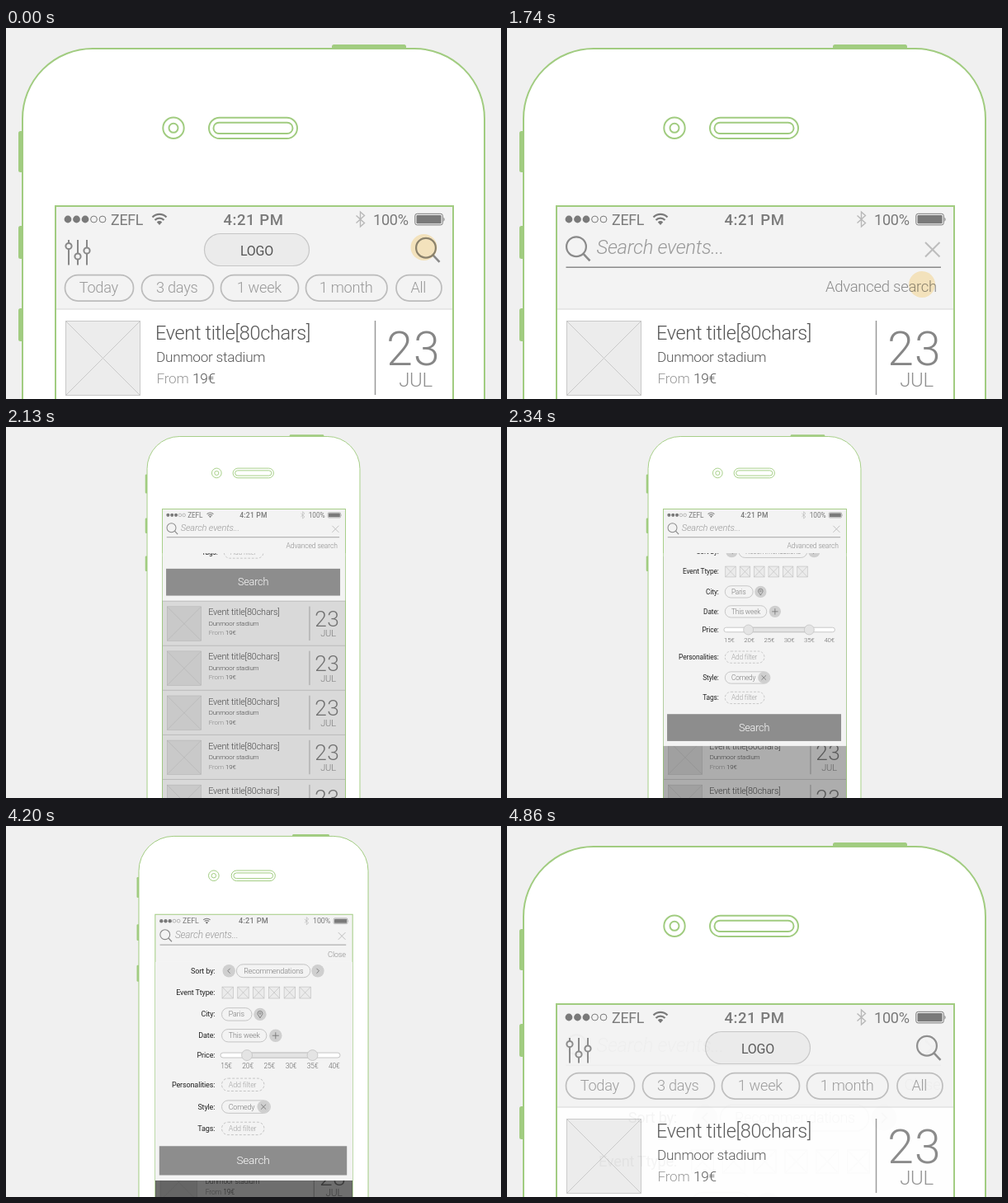
Recreate the animation shown at these times as an HTML page. Size 600 by 450 pixels, loop 6.46 s.

```html
<!DOCTYPE html>
<html lang="en">
<head>
<meta charset="utf-8">
<title>Event search</title>
<style>
  html, body { margin: 0; width: 100%; height: 100%; overflow: hidden; background: #f0f0f0; }
  svg { display: block; width: 100vw; height: 100vh; }
  text { font-family: Roboto, "Liberation Sans", sans-serif; font-weight: 300; letter-spacing: -.015em; white-space: pre; }
  .reg { font-weight: 400; }
  .med { font-weight: 500; letter-spacing: .03em; }
  .day { letter-spacing: .02em; }
  .touch { mix-blend-mode: multiply; fill: #ffeec6; }
</style>
</head>
<body>
<svg id="stage" viewBox="0 0 600 450"></svg>
<script>
const LOOP = 6460, STEP = 30, SMALL = 0.4606;
const CLOSED = 341, OPEN = 866, ROW = 117.4, HEADER_END = 332;
const GREEN = '#a1cc80';

// ---- drawing helpers ----
const text = (x, y, s, size, fill, anchor = 'start', extra = '') =>
  `<text x="${x}" y="${y}" font-size="${size}" fill="${fill}" text-anchor="${anchor}" ${extra}>${s}</text>`;
const rect = (x, y, w, h, attrs) => `<rect x="${x}" y="${y}" width="${w}" height="${h}" ${attrs}/>`;
const circle = (x, y, r, attrs) => `<circle cx="${x}" cy="${y}" r="${r}" ${attrs}/>`;
const path = (d, stroke, width = 2, extra = '') =>
  `<path d="${d}" fill="none" stroke="${stroke}" stroke-width="${width}" ${extra}/>`;
const group = (id, body, extra = '') => `<g id="${id}" ${extra}>${body}</g>`;
const pill = (x1, x2, y, h, extra = '') =>
  rect(x1, y - h / 2, x2 - x1, h, `rx="${h / 2}" fill="none" stroke="#bcbcbc" stroke-width="1.7" ${extra}`);
const crossBox = (x, y, w, h, fill, stroke, width) =>
  rect(x, y, w, h, `fill="${fill}" stroke="${stroke}" stroke-width="${width}"`) +
  path(`M${x} ${y}l${w} ${h}m0 ${-h}l${-w} ${h}`, stroke, width);

// ---- parts of the picture ----
function phone() {
  const line = `fill="none" stroke="${GREEN}" stroke-width="2"`;
  const key = (x, y, w, h) => rect(x, y, w, h, `rx="2.5" fill="${GREEN}"`);
  return key(15, 125, 9, 50) + key(15, 240, 9, 40) + key(15, 340, 9, 40) + key(395, 20, 90, 9) +
    rect(20, 25, 560, 1200, `rx="85" fill="#fff" stroke="${GREEN}" stroke-width="2"`) +
    circle(203, 121.3, 12.7, line) + circle(203, 121.3, 5.5, line) +
    rect(246, 108.7, 107, 25.4, `rx="12.7" ${line}`) + rect(251.5, 114.7, 96, 13.4, `rx="6.7" ${line}`);
}

function row(k) {
  const y = CLOSED + k * ROW;
  return path(`M61 ${y}H541`, k ? '#cacaca' : '#e2e2e2', 1.5) +
    crossBox(72.5, y + 14.5, 90, 90, '#ececec', '#c9c9c9', 1) +
    text(181, y + 37.4, 'Event title[80chars]', 23.5, '#555') +
    text(182, y + 64, 'Dunmoor stadium', 17.2, '#555') +
    text(182.5, y + 89.5, 'From', 17.2, '#999') +
    text(226, y + 89.5, '19€', 17.2, '#555') +
    path(`M447.5 ${y + 14}v90`, '#999', 1.5) +
    text(494, y + 67.5, '23', 57, '#868686', 'middle', 'class="day"') +
    text(496.5, y + 94, 'JUL', 24, '#909090', 'middle');
}

function status() {
  const c = '#7a7a7a';
  let s = '';
  for (let i = 0; i < 5; i++)
    s += circle(75 + i * 10.5, 232, i < 3 ? 4.4 : 3.9, i < 3 ? `fill="${c}"` : `fill="none" stroke="${c}"`);
  return s + text(127, 238.5, 'ZEFL', 17.8, c, 'start', 'class="reg"') +
    path('M177.5 229.5a12 12 0 0 1 17 0M180.5 233a7.7 7.7 0 0 1 11 0', c, 2.3) +
    `<path d="M186 239l-3.2 -3.6a4.5 4.5 0 0 1 6.4 0z" fill="${c}"/>` +
    text(300, 238.5, '4:21 PM', 18.5, c, 'middle', 'class="med"') +
    path('M424.5 227.5l10 9l-5 4.5v-18l5 4.5l-10 9', '#b8b8b8', 1.4) +
    text(445, 238.5, '100%', 18.1, c, 'start', 'class="reg"') +
    rect(495.8, 225.3, 33.5, 13.6, `rx="2.5" fill="none" stroke="${c}"`) +
    rect(497.5, 227, 30.1, 10.2, `rx="1" fill="${c}"`) +
    `<path d="M530.5 229.5q2.2 2.6 0 5.2z" fill="${c}"/>`;
}

function home() {
  const tabs = [['Today', 71.5, 154.5], ['3 days', 164.5, 251.5], ['1 week', 260.5, 354.5],
    ['1 month', 363.5, 462], ['All', 473, 528]];
  const sliders = [[76, 264.5], [87, 277], [98, 270]].map(([x, y]) =>
    path(`M${x} 257V${y - 3.6}M${x} ${y + 3.6}V287.5`, '#888') +
    circle(x, y, 3.6, 'fill="none" stroke="#888" stroke-width="2"')).join('');
  return sliders +
    rect(240.5, 249.5, 127, 39, 'rx="19.5" fill="#ebebeb" stroke="#c6c6c6" stroke-width="1.2"') +
    text(304, 275.5, 'LOGO', 16, '#555', 'middle', 'class="reg"') +
    tabs.map(([s, a, b]) => pill(a, b, 315.3, 31.5) +
      text((a + b) / 2 - 0.7, 321.3, s, 18.2, '#999', 'middle')).join('');
}

const lens = () => circle(84, 265.2, 11.9, 'fill="none" stroke="#8a8a8a" stroke-width="2.2"') +
  path('M92.5 273.8l8 8.6', '#8a8a8a', 2.6);

function filters() {
  const label = (y, s) => text(206, y + 6, s, 18.2, '#222', 'end', 'class="reg"');
  const chip = (y, s, x2, fill = '#777', extra = '') =>
    pill(222.5, x2, y, 31, extra) + text(239, y + 6, s, 18, fill);
  const dot = (x, y, d) => circle(x, y, 15.5, 'fill="#cfcfcf"') + path(`M${x} ${y}${d}`, '#777', 1.8);
  const addFilter = y => chip(y, 'Add filter', 326, '#a2a2a2', 'stroke-dasharray="6 4"');
  let s = label(354, 'Sort by:') + dot(240, 354, 'm3 -6l-6 6l6 6') + pill(258.5, 438.5, 354, 32) +
    text(349, 360, 'Recommendations', 18, '#777', 'middle') + dot(457, 354, 'm-3 -6l6 6l-6 6');
  s += label(407, 'Event Ttype:');
  for (let i = 0; i < 6; i++) s += crossBox(223.5 + i * 37.8, 393, 27, 28, '#ebebeb', '#bdbdbd', 1.3);
  s += label(460, 'City:') + chip(460, 'Paris', 296) +
    dot(316, 460, 'm0 9c-2 -5 -6 -7 -6 -11a6 6 0 0 1 12 0c0 4 -4 6 -6 11z') +
    circle(316, 458, 2, 'fill="none" stroke="#777" stroke-width="1.4"');
  s += label(512, 'Date:') + chip(512, 'This week', 332) + dot(354, 512, 'm-8 0h16m-8 -8v16');
  s += label(560, 'Price:') + rect(219.5, 554, 292, 12, 'rx="6" fill="#fff" stroke="#bcbcbc" stroke-width="1.7"') +
    rect(284, 554, 160, 12, 'fill="#e4e4e4" stroke="#bcbcbc" stroke-width="1.7"');
  for (const x of [284, 444]) s += circle(x, 560, 13, 'fill="#e4e4e4" stroke="#c4c4c4" stroke-width="1.7"');
  for (let i = 0; i < 6; i++) s += text(233.5 + i * 52.7, 592, 15 + i * 5 + '€', 17, '#666', 'middle');
  s += label(632, 'Personalities:') + addFilter(632);
  s += label(686, 'Style:') + chip(686, 'Comedy', 341) + dot(324.5, 686, 'm-6 -6l12 12m0 -12l-12 12');
  s += label(739, 'Tags:') + addFilter(739);
  return s + rect(70, 782, 458, 71, 'fill="#8d8d8d"') + text(299, 826.5, 'Search', 27.5, '#fff', 'middle');
}

document.getElementById('stage').innerHTML =
  `<defs><clipPath id="below">${rect(60, HEADER_END, 482, 900, '')}</clipPath></defs>` +
  rect(0, 0, 600, 450, 'fill="#f0f0f0"') +
  group('world', phone() +
    rect(60, 216, 482, 1000, 'fill="#fff"') +
    rect(60, 216, 482, CLOSED - 216, 'fill="#f3f3f3"') +
    [0, 1, 2, 3, 4, 5].map(row).join('') +
    rect(60, 216, 482, 1000, `fill="none" stroke="${GREEN}" stroke-width="2"`) +
    group('panel',
      rect(60, CLOSED, 482, 875, 'id="shade"') +
      rect(60, HEADER_END, 482, 0, 'id="sheet" fill="#f3f3f3"') +
      group('filters', filters()), 'clip-path="url(#below)"') +
    status() + group('home', home()) +
    group('homeLens', lens(), 'transform="translate(425 1.5)"') +
    group('search',
      path('M0 0', '#8a8a8a', 1.6, 'id="rule"') + group('lens', lens()) +
      group('hint', text(108.5, 274, 'Search events...', 24, '#999', 'start', 'font-style="italic"') +
        path('M507 260l17.5 17.5m0 -17.5l-17.5 17.5', '#bdbdbd', 2)) +
      group('advanced', text(521, 319.6, 'Advanced search', 18.5, '#8a8a8a', 'end')) +
      group('close', text(525.5, 319.6, 'Close', 18.5, '#8a8a8a', 'end'))) +
    circle(0, 0, 16, 'id="touch" class="touch"'));

// ---- motion ----
const el = {};
document.querySelectorAll('svg [id]').forEach(e => el[e.id] = e);
const set = (id, name, value) => el[id].setAttribute(name, value);
const fade = (id, value) => set(id, 'opacity', value.toFixed(3));
const lin = (t, a, b) => Math.min(1, Math.max(0, (t - a) / (b - a)));
const sine = p => 0.5 - 0.5 * Math.cos(Math.PI * p);
const cubic = p => p < 0.5 ? 4 * p ** 3 : 1 - 4 * (1 - p) ** 3;
const soft = p => 0.45 * p + 0.55 * sine(p);

// Two rests stop just short of the end of their fades.
function pictureTime(ms) {
  const t = Math.floor(ms % LOOP / STEP) * STEP;
  if (t >= 4860) return 4860;
  return t >= 2610 && t < 4200 ? 2610 : t;
}

function ripple(t) {
  const second = t >= 1740;
  const p = second ? lin(t, 1740, 2010) : lin(t, 30, 390);
  set('touch', 'cx', second ? 503 : 506.5);
  set('touch', 'cy', second ? 311 : 266);
  set('touch', 'r', 16 + 22 * p);
  fade('touch', 1 - p);
}

function draw(ms) {
  const t = pictureTime(ms);
  const zoom = soft(lin(t, 1740, 2010)) - soft(lin(t, 4170, 4440));
  const s = 1 - (1 - SMALL) * zoom;
  set('world', 'transform', `translate(${300 * (1 - s)} 0) scale(${s})`);

  const leave = lin(t, 4650, 4870);
  const move = cubic(lin(t, 480, 720));
  const show = lin(t, 690, 870);
  fade('home', Math.max(1 - lin(t, 30, 420), leave));
  fade('homeLens', t < 480 ? 1 : leave);
  fade('search', t < 480 ? 0 : 1 - leave);
  set('lens', 'transform', `translate(${425 * (1 - move)} ${1.5 * (1 - move)})`);
  set('rule', 'd', `M${71.5 + 426 * (1 - move)} 290.3H526`);
  fade('rule', t <= 480 ? 0 : 0.4 + 0.6 * lin(t, 480, 870));
  fade('hint', show);

  const swap = lin(t, 2370, 2640);
  fade('advanced', show * (1 - swap));
  fade('close', swap);

  const bottom = CLOSED + (OPEN - CLOSED) * sine(lin(t, 2010, 2395));
  set('sheet', 'height', bottom - HEADER_END);
  set('filters', 'transform', `translate(0 ${bottom - OPEN})`);
  fade('filters', t < 2010 ? 0 : 1);
  fade('shade', 0.57 * lin(t, 1950, 2640));
  fade('panel', t < 1950 ? 0 : 1 - leave);
  ripple(t);
}

const start = performance.now();
function tick() {
  draw(performance.now() - start);
  requestAnimationFrame(tick);
}
draw(0);
tick();
</script>
</body>
</html>
```
